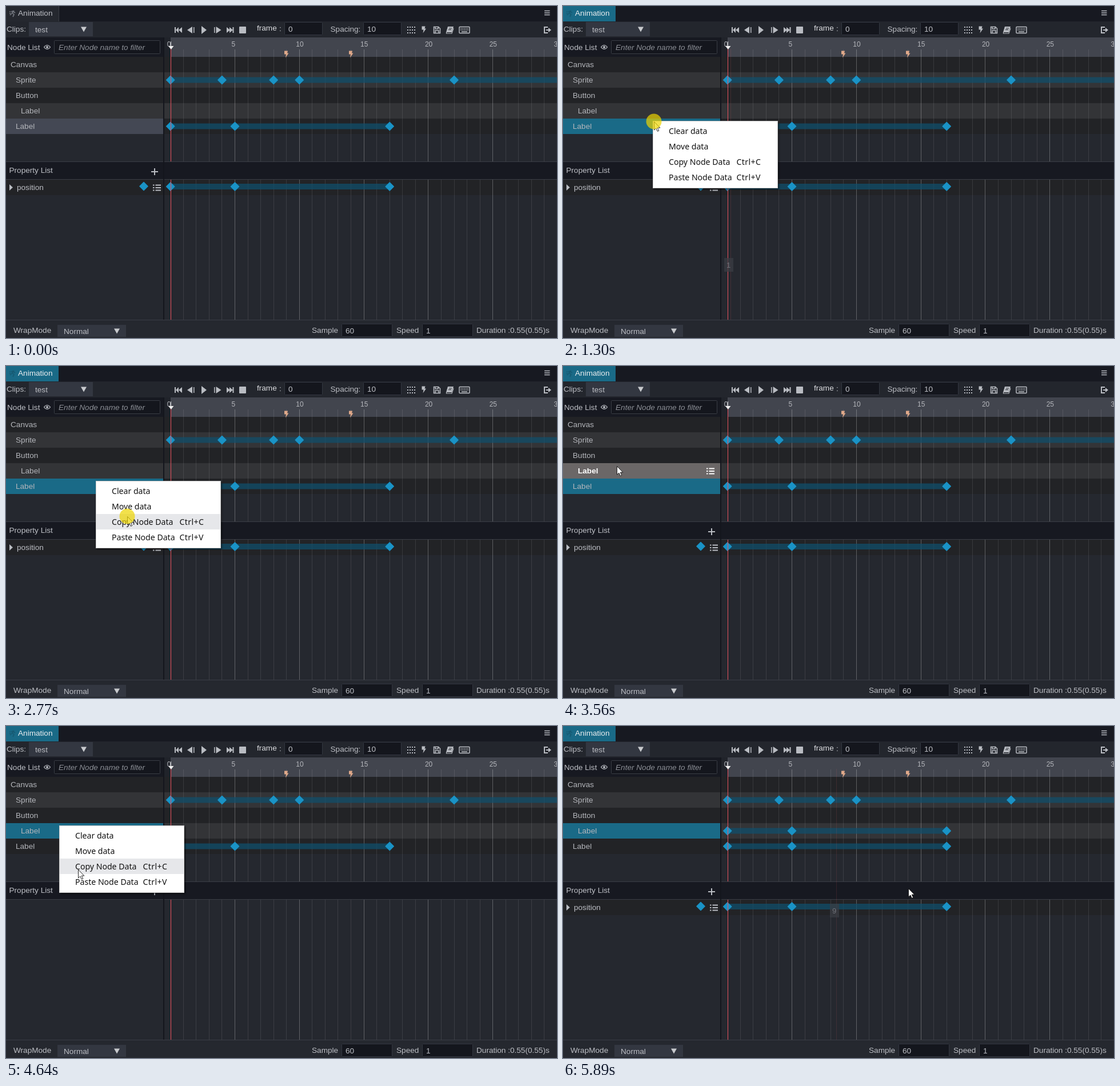
These frames come from a looping animation (964 by 581 pixels, 5.96 s). An HTML page:

```html
<!DOCTYPE html>
<html lang="en">
<head>
<meta charset="utf-8">
<title>Animation editor</title>
<style>
html, body { margin: 0; width: 100%; height: 100%; overflow: hidden; background: #25282f; }
svg { display: block; font-family: "Liberation Sans", Arial, sans-serif; }
.menu { filter: drop-shadow(2px 2px 1.5px rgba(0,0,0,.5)); }
.menu text { font-family: "Noto Sans", "Open Sans", sans-serif; }
</style>
</head>
<body>
<svg id="stage" width="964" height="581" viewBox="0 0 964 581"></svg>
<script>
const LOOP = 5960;
const DARK = '#171921', FIELD = '#14161d', EDGE = '#3a3d45', SELECT = '#333741';
const TEXT = '#bcbec4', ICON = '#b9bcc2', KEY = '#1a93c6', BLUE = '#1a6a87';

// Pointer moves: start, end, number of steps, destination x, y
const MOVES = [
  [300, 300, 1, 806, 563], [376, 603, 4, 293, 453], [679, 754, 2, 200, 318],
  [830, 830, 1, 172, 228], [920, 1070, 3, 159, 202], [1670, 1980, 5, 204, 253],
  [2150, 2210, 2, 212, 263], [2990, 3400, 6, 94, 175], [4334, 4720, 6, 137, 277],
  [4800, 4800, 1, 141, 275], [5740, 5740, 1, 270, 300], [5815, 5815, 1, 478, 323],
  [5890, 5890, 1, 604, 284]
];
const CLICKS = [[1300, 1440], [2770, 2840], [3400, 3560], [4180, 4330], [5030, 5190]];
const MENUS = [[1300, 2840, 157, 201], [4180, 5190, 93, 174]];
const ROWS = [['Canvas', 8], ['Sprite', 17], ['Button', 17], ['Label', 26], ['Label', 17]];

const within = (t, [a, b]) => t >= a && t < b;
const frameX = n => 287.7 + 22.56 * n;
const rowY = i => 89 + 27 * i;

const rect = (x, y, w, h, fill, more = '') =>
  `<rect x="${x}" y="${y}" width="${w}" height="${h}" fill="${fill}" ${more}/>`;
const text = (x, y, s, fill = TEXT, size = 13.6, more = '') =>
  `<text x="${x}" y="${y}" fill="${fill}" font-size="${size}" ${more}>${s}</text>`;
const path = (d, fill = ICON, more = '') => `<path d="${d}" fill="${fill}" ${more}/>`;
const line = (d, color = ICON, width = 1.5, more = '') =>
  path(d, 'none', `stroke="${color}" stroke-width="${width}" ${more}`);
const field = (x, y, w, h, s) =>
  rect(x + .5, y + .5, w - 1, h - 1, FIELD, `stroke="${SELECT}" rx="1"`) + text(x + 7, y + 16.5, s);
const select = (x, y, w, h, s) =>
  rect(x, y, w, h, SELECT) + text(x + 11, y + h / 2 + 5, s) +
  path(`M${x + w - 21} ${y + h / 2 - 4}h10l-5 9z`, '#c8cace');
const bolt = (x, y, color) => path(`M${x - 3} ${y - 6}h6l-1 4h2.500l-5.500 8 1-6h-3z`, color);
const diamond = (x, y) =>
  path(`M${x} ${y - 7}l7 7-7 7-7-7z`, KEY, `stroke="${KEY}" stroke-width="1.6" stroke-linejoin="round"`);
const listIcon = (x, y, color) =>
  line([-4.5, 0, 4.5].map(d => `M${x - 7} ${y + d}h2.500m2 0h9.500`).join(''), color, 2);

function track(y, keys, end = keys[keys.length - 1]) {
  return rect(287.7, y - 5, frameX(end) - 287.7, 10, 'rgba(16,80,108,.72)') +
    keys.map(n => diamond(frameX(n), y)).join('');
}

function toolbar() {
  return rect(0, 27, 964, 28, '#23262d') +
    text(1, 45, 'Clips:') + select(40, 28, 112, 25, 'test') +
    path('M295 37h2v10h-2zM302 37v10l-5-5zM308 37v10l-6-5z') +
    path('M326 36v12l-9-6zM328 37h1.500v10h-1.500z') +
    path('M342 35l9 7-9 7z') +
    path('M364 37h1.500v10h-1.500zM367.500 36l9 6-9 6z') +
    path('M386 37l6 5-6 5zM391 37l6 5-6 5zM396.500 37h2v10h-2z') +
    rect(408, 36, 12, 12, ICON, 'rx="1"') +
    text(439, 43, 'frame', '#dcdde0') + text(478, 44, ':') + field(487, 28, 67, 23, '0') +
    text(567.5, 45, 'Spacing:') + field(625, 28, 67, 23, '10') +
    line('M702 37h14M702 42h14M702 47h14', ICON, 2, 'stroke-dasharray="2 2"') +
    bolt(730.5, 41.500, ICON) +
    line('M748.500 36.500h8l3 3v8h-11zM751 37v3h5v-3M751 47v-4h6v4') +
    path('M773 36h10l-3 10h-10z') + line('M770.500 46v2h9.500l3-9', ICON, 1.200) +
    line('M775 39h5M774 41.500h5', '#23262d', 1) +
    line('M794 36.500h16q1 0 1 1v9q0 1-1 1h-16q-1 0-1-1v-9q0-1 1-1z') +
    line('M795.500 39.500h13M795.500 42h13', ICON, 1.500, 'stroke-dasharray="1.500 1.400"') +
    line('M797 45h10') +
    line('M948 37h-6v10h6', ICON, 2) + line('M945 42h5', ICON, 2) + path('M949 38l5 4-5 4z');
}

function titleBar(active) {
  const mark = active ? '#175a73' : '#70747c';
  return rect(0, 0, 964, 27, DARK) + rect(0, 0, 92, 27, active ? BLUE : '#25282f') +
    (active ? '' : rect(92, 0, 1, 27, EDGE)) +
    line('M14 8l-3 4 3 3-2 4M11 12l-4 4M9 10l3-1 4 3M6 10h2M6 13h2', mark, 1.700) +
    text(21, 17, 'Animation', active ? '#eceef0' : TEXT) +
    line('M942 8.500h9.500M942 12h9.500M942 15.500h9.500');
}

function ruler() {
  let out = rect(0, 55, 277, 34, DARK) + rect(277, 55, 11, 34, '#20232a') +
    rect(288, 55, 676, 34, '#42454e') +
    text(2, 77, 'Node List') +
    line('M66.500 72q5.500-7 11 0q-5.500 7-11 0z', ICON, 1.200) +
    `<circle cx="72" cy="72" r="2" fill="${ICON}"/>` +
    rect(84.5, 60.5, 185, 23, FIELD, `stroke="${EDGE}" rx="1"`) +
    text(92, 77, 'Enter Node name to filter', '#8b8e95', 13.6, 'font-style="italic"');
  for (let n = 0; n <= 30; n += 5) out += text(frameX(n) - 6, 71, n, '#b4b6bb', 12);
  return out;
}

function grid() {
  let out = '';
  for (let n = 1; n <= 30; n++) {
    const x = Math.floor(frameX(n)), color = `rgba(255,255,255,${n % 5 ? .1 : .27})`;
    out += rect(x, 76, 1, 196, color) + rect(x, 304, 1, 245, color);
  }
  return out;
}

function nodeRows(t, selected, hovered) {
  return ROWS.map(([name, x], i) => {
    const y = rowY(i), hot = i === hovered;
    let bg = '';
    if (i === selected) bg = t < 1300 ? '#444854' : BLUE;
    else if (hot) bg = '#6b6767';
    return rect(0, y, 964, 27, i % 2 ? '#333437' : '#222326') +
      (bg && rect(0, y, 275, 27, bg)) +
      text(x, y + 18, name, hot ? '#fff' : '#b4b6bb', 13.6, hot ? 'font-weight="bold"' : '') +
      (hot ? listIcon(258, y + 14, '#fff') : '');
  }).join('');
}

function propertyPane(shown, hot, dividerHot) {
  let out = rect(0, 272, 964, dividerHot ? 3 : 1, EDGE) +
    rect(0, dividerHot ? 275 : 273, 964, dividerHot ? 28 : 30, DARK) + rect(0, 303, 964, 1, EDGE) +
    text(5.5, 292, 'Property List') + line('M254 290h12M260 284v12', ICON, 2);
  if (shown) out += rect(0, 304, 964, 27, '#222326') +
    (hot ? rect(0, 304, 275, 27, '#6b6767') : '') +
    path('M6 312l6 5.500-6 5.500z') + text(19, 322, 'position', hot ? '#fff' : TEXT) +
    diamond(241, 315.5) + listIcon(264, 318, ICON);
  return out;
}

function footer() {
  return rect(0, 549, 964, 32, '#25282f') + rect(0, 549, 964, 1, EDGE) +
    text(13, 572, 'WrapMode') + select(90, 558, 120, 21, 'Normal') +
    text(535, 572, 'Sample') + field(587, 556, 89, 23, '60') +
    text(683, 572, 'Speed') + field(728, 556, 89, 23, '1') +
    text(823, 572, 'Duration :0.55(0.55)s');
}

function contextMenu([, , x, y], mouseY) {
  const row = Math.floor((mouseY - y - 4) / 27);
  const items = [['Clear data'], ['Move data'], ['Copy Node Data', 'Ctrl+C'], ['Paste Node Data', 'Ctrl+V']];
  return `<g class="menu">${rect(x + .5, y + .5, 218, 117, '#fff', 'stroke="#ccc"')}` +
    (row >= 0 && row < 4 ? rect(x + 1, y + 4 + 27 * row, 217, 27, '#e6e7ea') : '') +
    items.map(([name, keys = ''], i) =>
      text(x + 28, y + 22.5 + 27 * i, name, '#111', 14.1) +
      text(x + 146.5, y + 22.5 + 27 * i, keys, '#111', 14.1, 'letter-spacing=".4"')).join('') + '</g>';
}

// Pointer position and the last spot it touched on the lower timeline
function pointer(t) {
  let x = 806, y = 563, tip = null;
  for (const [start, end, n, toX, toY] of MOVES) {
    const fromX = x, fromY = y;
    for (let k = 1; k <= n; k++) {
      if (t < start + (n > 1 ? (end - start) * (k - 1) / (n - 1) : 0)) return { x, y, tip };
      const u = k / n, e = n > 4 ? u * u * (3 - 2 * u) : u;
      x = Math.round(fromX + (toX - fromX) * e);
      y = Math.round(fromY + (toY - fromY) * e);
      if (x > 280 && y > 304 && y < 549) tip = { x, y };
    }
  }
  return { x, y, tip };
}

function frameTip({ x, y }) {
  return rect(x, 75, 1, 474, 'rgba(230,90,100,.14)') +
    rect(x - 11, y - 12, 16, 24, '#3a3d43', 'opacity=".75"') +
    text(x - 3.5, y + 4.5, Math.ceil((x - 287.7) / 22.56), '#70737a', 13, 'text-anchor="middle"');
}

function cursor(x, y, resize) {
  const d = resize
    ? `M${x} ${y - 10}l4.500 5h-3.500v9h3.500l-4.500 5-4.500-5h3.500v-9h-3.500z`
    : `M${x + .5} ${y + .5}v14.500l3.400-3 2.400 5.300 2.400-1-2.400-5.200h4.500z`;
  return path(d, '#fff', 'stroke="#111" stroke-width=".9"');
}

function draw(t) {
  const { x, y, tip } = pointer(t);
  const menu = MENUS.find(m => within(t, m));
  const pasted = t >= 5190, shown = t < 3700 || pasted;
  const dividerHot = within(t, [5190, 5740]);
  const free = t >= 300 && !menu && x < 275;
  const hovered = free ? Math.floor((y - 89) / 27) : -1;

  let out = titleBar(t >= 1300) + toolbar() + ruler() +
    nodeRows(t, t < 3700 ? 4 : 3, hovered) +
    propertyPane(shown, free && y >= 304 && y < 331, dividerHot) +
    rect(275, 55, 2, 494, FIELD) + grid() +
    track(129.5, [0, 4, 8, 10, 22], 33) +
    (pasted ? track(183.5, [0, 5, 17]) : '') +
    track(210.5, [0, 5, 17]) +
    (shown ? track(316, [0, 5, 17]) : '') +
    bolt(490, 84.5, '#e0a98a') + bolt(603, 84.5, '#e0a98a') +
    rect(288, 75, 1, 197, '#e8525f') + rect(288, 304, 1, 245, '#e8525f') +
    rect(288, 62, 1, 9, '#cfd1d5') + path('M284 70h9.500l-4.750 6z', '#eee');
  if (tip && (t < 1380 || t >= 5740)) out += frameTip(tip);
  out += footer();
  if (menu) out += contextMenu(menu, y);
  if (t >= 300) out += cursor(x, y, dividerHot);
  if (CLICKS.some(c => within(t, c)))
    out += `<circle cx="${x}" cy="${y}" r="13.5" fill="rgba(236,212,0,.7)"/>`;
  return out;
}

const stage = document.getElementById('stage');
let last = '';
function tick() {
  const next = draw(performance.now() % LOOP);
  if (next !== last) stage.innerHTML = last = next;
  requestAnimationFrame(tick);
}
tick();
</script>
</body>
</html>
```
